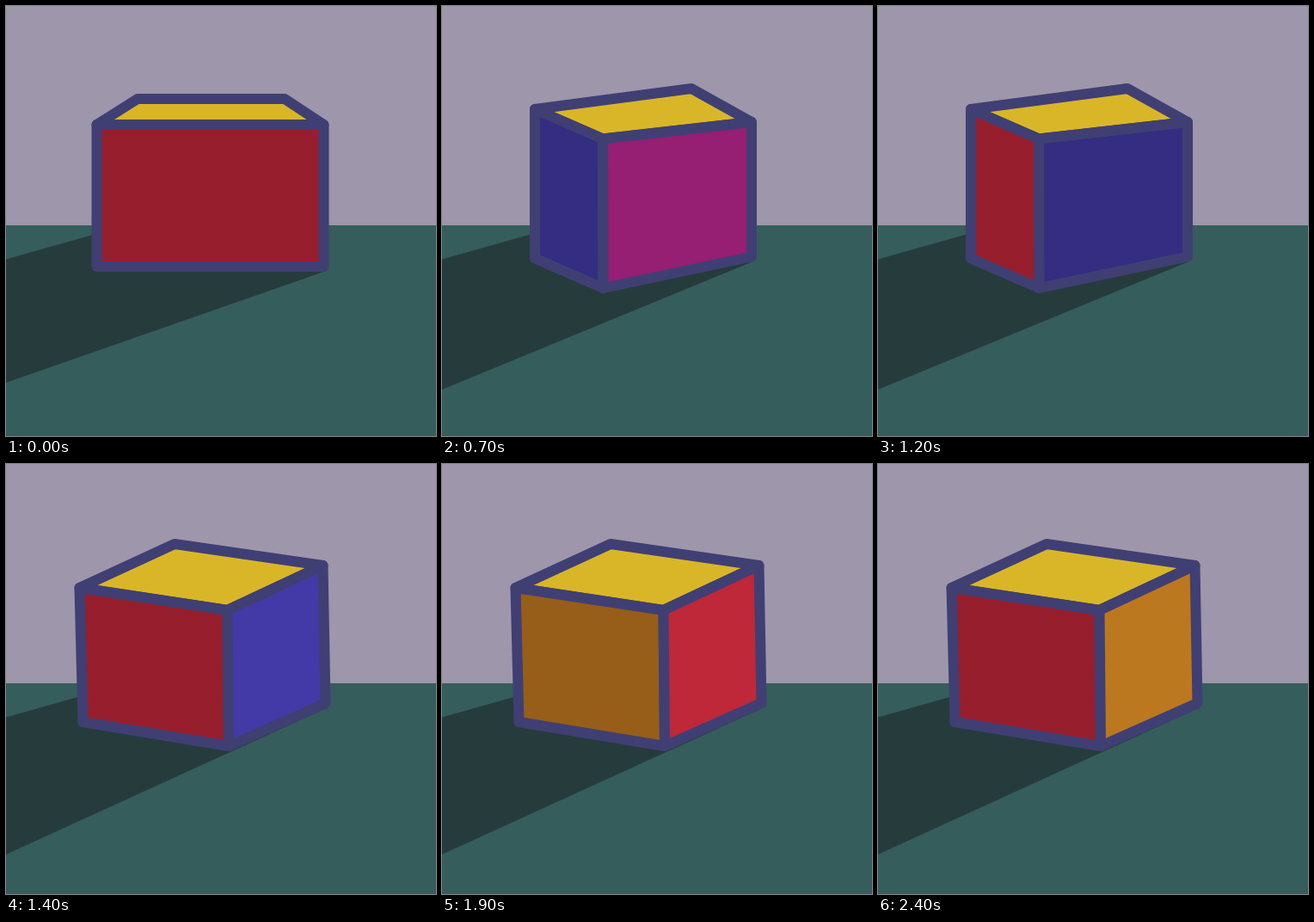
An HTML page with a canvas that plays this animation: 500 by 500 pixels, repeating every 2500 ms.

```html
<!DOCTYPE html>
<html lang="en">
<head>
<meta charset="utf-8">
<title>Turning box</title>
<style>
html, body { margin: 0; width: 100%; height: 100%; overflow: hidden; background: #9e96aa; }
canvas { display: block; width: 500px; height: 500px; }
</style>
</head>
<body>
<canvas id="stage" width="500" height="500"></canvas>
<script>
const ctx = document.getElementById('stage').getContext('2d');
ctx.lineWidth = 12;
ctx.lineJoin = 'round';

const WALL = '#9e96aa', FLOOR = '#355d5b', SHADOW = '#263c3c';
const EDGE = '#403f73', LID = '#d9b628';

// Each side: shaded and lit
const RED = { dark: '#971f2d', light: '#be2839' };
const PINK = { dark: '#961e73', light: '#be2891' };
const BLUE = { dark: '#342d82', light: '#433aa8' };
const ORANGE = { dark: '#965e18', light: '#bc781f' };
const SIDES = [RED, PINK, BLUE, RED, ORANGE];

const TURN = 500;

// Corners run left to right; cast is where the shadow leaves the stage
const FRONT = {
  back: [[153, 108], [324, 108]],
  rim: [[105.5, 138], [369.5, 138]],
  foot: [[105.5, 303], [369.5, 303]],
  cast: 438
};
const ENTER = {
  back: [[290, 96]],
  rim: [[108, 120], [187, 154.5], [360, 135]],
  foot: [[108, 293.5], [187.5, 328], [360, 291.5]],
  cast: 446
};
const GROW = {
  back: [[196, 93]],
  rim: [[85.5, 144], [257.5, 170], [368.5, 118]],
  foot: [[89.5, 300], [259, 328], [371.5, 278]],
  cast: 454
};

function fill(points, color) {
  ctx.beginPath();
  for (const [x, y] of points) ctx.lineTo(x, y);
  ctx.closePath();
  ctx.fillStyle = color;
  ctx.fill();
}

function drawFace(points, color) {
  fill(points, color);
  ctx.strokeStyle = EDGE;
  ctx.stroke();
}

function drawBox({ back, rim, foot, cast }, colors) {
  const [x, y] = foot[foot.length - 1];
  fill([[0, 294.5], [110, 263.5], [x + 3, y + 5], [0, cast]], SHADOW);
  drawFace([...rim, ...[...back].reverse()], LID);
  colors.forEach((color, i) => {
    drawFace([rim[i], rim[i + 1], foot[i + 1], foot[i]], color);
  });
}

function draw(time) {
  const turn = Math.floor(time / TURN);
  const phase = time % TURN;
  const side = SIDES[turn % SIDES.length];
  const next = SIDES[(turn + 1) % SIDES.length];

  ctx.fillStyle = WALL;
  ctx.fillRect(0, 0, 500, 255);
  ctx.fillStyle = FLOOR;
  ctx.fillRect(0, 255, 500, 245);

  if (phase < 200) drawBox(FRONT, [side.dark]);
  else if (phase < 400) drawBox(ENTER, [next.dark, side.dark]);
  else drawBox(GROW, [next.dark, side.light]);
}

const start = performance.now();
function tick() {
  draw(performance.now() - start);
  requestAnimationFrame(tick);
}
tick();
</script>
</body>
</html>
```
